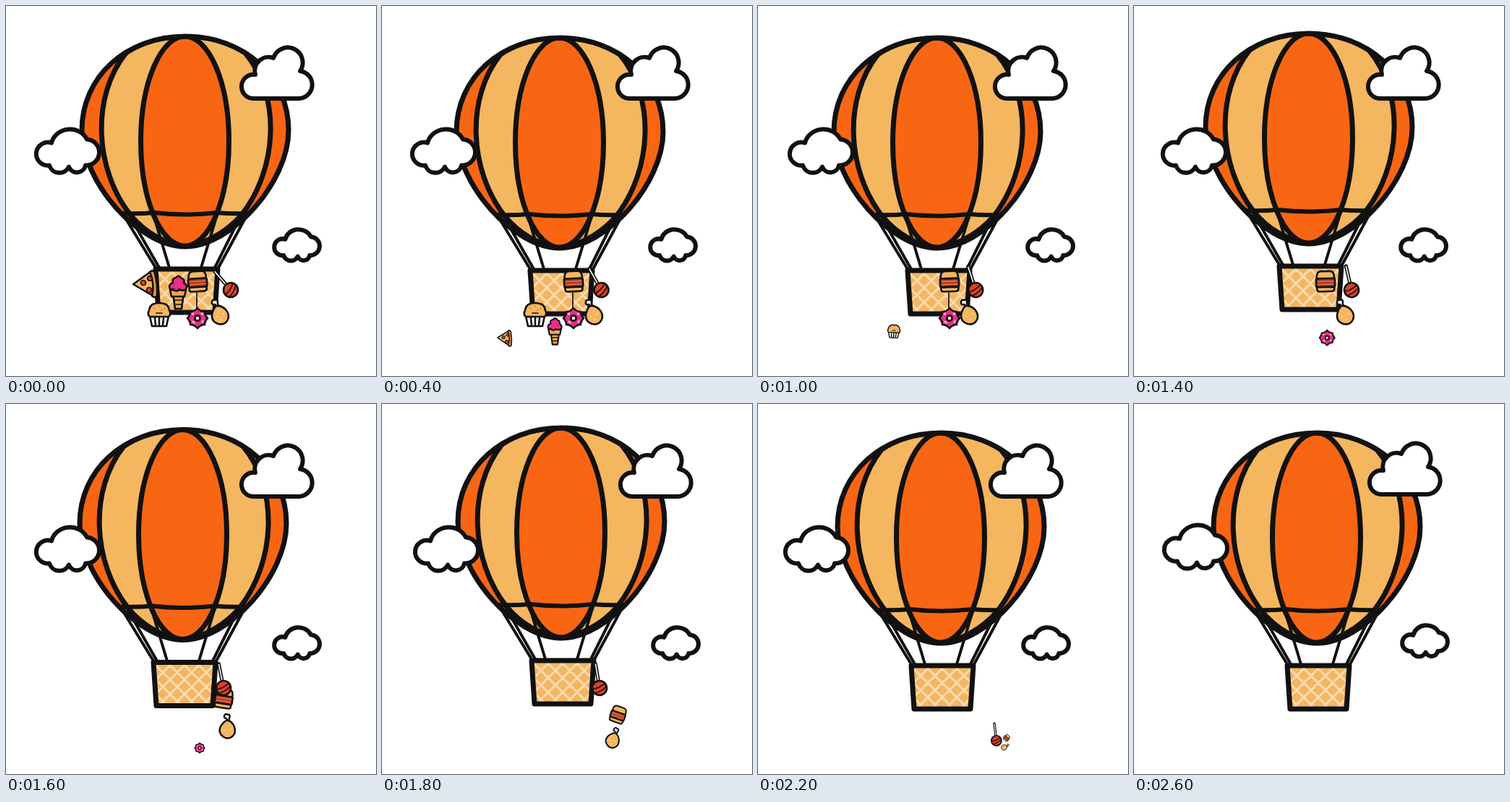
Recreate the animation shown at these times as an HTML page. Size 512 by 512 pixels, loop 2.8 s.

```html
<!DOCTYPE html>
<html lang="en">
<head>
<meta charset="utf-8">
<title>Balloon</title>
<style>
html, body { margin: 0; width: 100%; height: 100%; overflow: hidden; background: #fff; }
svg { display: block; width: 100vw; height: 100vh; }
.ink { stroke: #111; stroke-linejoin: round; stroke-linecap: round; }
.line { fill: none; }
.tan { fill: #f5b660; }
.orange { fill: #f86614; }
.red { fill: #dd4326; }
.pink { fill: #ea2d86; }
.white { fill: #fff; }
#food .ink { stroke-width: 2.6; }
#food .thin { stroke-width: 1.7; }
#clouds path { fill: #fff; stroke-width: 6; vector-effect: non-scaling-stroke; }
</style>
</head>
<body>
<svg viewBox="0 0 512 512">
  <defs>
    <path id="hull" d="M248 42C330 42 391 98 391 172C391 244 312 333 248 333C184 333 105 244 105 172C105 98 166 42 248 42Z"/>
    <path id="gore" d="M248 42Q200 42 166 65C118 125 122 225 172 289Q202 325 248 333Q294 325 326 289C376 225 381 125 331 65Q296 42 248 42Z"/>
    <path id="box" d="M207 364H293L289 424H211Z"/>
    <clipPath id="boxClip"><use href="#box"/></clipPath>
    <clipPath id="hullClip"><use href="#hull"/></clipPath>
  </defs>

  <g id="balloon">
    <use href="#hull" class="orange"/>
    <g clip-path="url(#hullClip)" class="ink" stroke-width="7">
      <use href="#gore" class="tan"/>
      <ellipse class="orange" cx="247.5" cy="187" rx="61" ry="145"/>
    </g>
    <use href="#hull" class="ink line" stroke-width="7"/>
    <path class="ink line" stroke-width="6" d="M160 287Q185 288 205 286Q248 291 292 286Q312 288 337 287"/>
    <path class="ink line" stroke-width="4" d="M163 290L207 362M173 294L212 362M204 289L226 362M333 290L294 362M323 294L289 362M292 289L270 362"/>
    <use href="#box" class="tan"/>
    <path id="lattice" clip-path="url(#boxClip)" fill="none" stroke="#f8dcb4" stroke-width="3"/>
    <use href="#box" class="ink line" stroke-width="7"/>
  </g>

  <g id="food">
    <g id="pizza">
      <path class="ink tan" d="M-17 1L8 -17Q16 0 12 18Z"/>
      <path class="ink" fill="#eb9440" d="M6 -16Q11 -20 13 -14Q17 2 16 17Q13 21 9 17Q13 0 6 -16Z"/>
      <g class="red ink thin">
        <circle cx="-3" cy="-1" r="3.5"/><circle cx="6" cy="-7" r="3.2"/><circle cx="5" cy="9" r="3.5"/>
      </g>
    </g>
    <g id="ice">
      <path class="ink" fill="#f2a750" d="M-7 0H8L5 22H-4Z"/>
      <path class="ink" fill="#f2a750" d="M-11 -4H11L9 5H-9Z"/>
      <path class="ink pink" d="M-11 -5Q-14 -12 -7 -14Q-9 -20 -3 -21Q1 -26 5 -20Q10 -19 8 -14Q14 -11 11 -5Q6 -2 2 -5Q-3 0 -6 -5Z"/>
      <path class="ink line thin" d="M-4 10H6M-3 16H5"/>
    </g>
    <g id="burger">
      <path class="ink tan" d="M-12 -3Q-13 -14 -6 -14H6Q13 -14 12 -3Z"/>
      <rect class="ink" fill="#a83322" x="-13" y="-4" width="26" height="12" rx="2"/>
      <path stroke="#ef7a38" stroke-width="1.6" d="M-11 0H11M-11 4H11"/>
      <path class="ink tan" d="M-12 8H12V11Q12 14 8 14H-8Q-12 14 -12 11Z"/>
    </g>
    <g id="lolli">
      <path class="ink" style="stroke-width:5" d="M0 -8V-34"/>
      <path stroke="#fff" stroke-width="1.6" d="M0 -10V-34"/>
      <circle class="ink red" r="10"/>
      <path class="ink line thin" d="M-9 0Q0 0 8 -5M-7 6Q2 5 9 0"/>
    </g>
    <g id="drum">
      <path class="ink white" d="M-4 -8L-7 -11Q-12 -10 -11 -15Q-10 -18 -7 -17Q-4 -19 -3 -15Q-4 -12 -1 -8Z"/>
      <path class="ink tan" d="M-5 -9Q2 -10 8 -4Q14 3 11 10Q7 18 -2 16Q-12 13 -11 3Q-9 -6 -5 -9Z"/>
      <path class="line" stroke="#fbe2b8" stroke-width="2" stroke-linecap="round" d="M-4 6h.1M2 10h.1M4 2h.1"/>
    </g>
    <g id="donut">
      <path id="string" class="ink thin" d="M-1 -35V-12"/>
      <path class="ink pink" d="M0 -14Q4 -9 10 -9Q10 -4 14 0Q10 4 10 9Q4 9 0 14Q-4 9 -10 9Q-10 4 -14 0Q-10 -4 -10 -9Q-4 -9 0 -14Z"/>
      <path stroke="#ffc3dc" stroke-width="2.2" d="M-8 -5l3 -2M5 -7l3 2M6 6l2 -3M-7 4l3 3"/>
      <circle class="ink white" r="3.6"/>
    </g>
    <g id="cupcake">
      <path class="ink white" d="M-13 2H13L10 16H-10Z"/>
      <path class="ink line" d="M-6 5L-5 14M0 5V14M6 5L5 14"/>
      <path class="ink tan" d="M-13 3Q-17 0 -14 -6Q-13 -16 0 -16Q13 -16 14 -6Q17 0 13 3Z"/>
      <path class="line" stroke="#de7a2a" stroke-width="2" stroke-linecap="round" d="M-7 -9h.1M0 -12h.1M7 -8h.1M3 -6h.1"/>
      <path class="ink line thin" d="M-4 -2H4"/>
    </g>
  </g>

  <g id="clouds" class="ink">
    <path d="M343 128A16.6 16.6 0 1 1 345 95A19 19 0 0 1 370 72A20.8 20.8 0 1 1 407 90A19.1 19.1 0 0 1 406 128Z"/>
    <path id="puff" transform="translate(0 -1.5)" d="M63 191A26 24 0 0 1 112 186A18 18 0 0 1 110 222A12 12 0 0 1 87 224A14.5 14.5 0 0 1 60 222A16 16 0 1 1 63 191Z"/>
    <path id="small" transform="translate(403 330) scale(.72) translate(-86 -201)"/>
  </g>
</svg>
<script>
const $ = id => document.getElementById(id);
const STEP = 200, STEPS = 14;

$("small").setAttribute("d", $("puff").getAttribute("d"));

let mesh = "";
for (let x = 120; x < 370; x += 20) mesh += `M${x} 358l74 74M${x} 358l-74 74`;
$("lattice").setAttribute("d", mesh);

// Turning points of the balloon: step, x, y
const sway = [[0, 0, 0], [2, -2, 2], [5, 0, 2], [7, -6, -4], [9, 0, -9], [11, 5, -2]];

// Each item falls along a curve (start, control, end) between two steps.
// size and turn are reached at the end; tilt and swing die away while hanging.
const items = {
  pizza:   { when: [0, 2],  path: [[193, 384], [182, 422], [170, 459]], size: .6, turn: 4 },
  ice:     { when: [0, 4],  path: [[238, 397], [238, 464], [242, 478]], size: .35 },
  cupcake: { when: [3, 6],  path: [[212, 427], [186, 430], [184, 476]], size: .12, turn: 5 },
  donut:   { when: [5, 8],  path: [[265, 432], [267, 449], [268, 476]], size: .5 },
  burger:  { when: [7, 11], path: [[265, 381], [349, 438], [344, 462]], size: .3, turn: 40, tilt: -4 },
  drum:    { when: [7, 11], path: [[292, 424], [325, 477], [342, 475]], size: .33, turn: 80, swing: 4 },
  lolli:   { when: [9, 12], path: [[301, 393], [332, 471], [335, 479]], size: .4, tilt: -41, swing: 10 }
};

const mix = (a, b, u) => a + (b - a) * u;
const curve = ([a, b, c], u, n) => mix(mix(a[n], b[n], u), mix(b[n], c[n], u), u);
const place = (id, x, y, rest = "") => $(id).setAttribute("transform", `translate(${x} ${y})${rest}`);

function swayAt(k) {
  const i = sway.findIndex(p => p[0] > k);
  if (i < 0) return sway[sway.length - 1].slice(1);
  const a = sway[i - 1], b = sway[i], u = (k - a[0]) / (b[0] - a[0]);
  return [mix(a[1], b[1], u), mix(a[2], b[2], u)];
}

function drawItem(id, k) {
  const { when: [from, to], path, size, turn = 0, tilt = 0, swing = 0 } = items[id];
  $(id).style.display = k > to ? "none" : "";
  const u = Math.min(1, Math.max(0, (k - from) / (to - from)));
  const x = curve(path, u, 0) + swing * .5 ** k;
  const angle = turn * u + tilt * .85 ** k;
  place(id, x, curve(path, u, 1), ` rotate(${angle}) scale(${mix(1, size, u ** 1.7)})`);
}

function draw(k) {
  const late = k > 11;
  place("balloon", ...swayAt(k));
  place("clouds", late ? 0 : Math.sin(k * Math.PI / 2) * (k > 8 ? 4 : 2), late ? -3 : 0);
  for (const id in items) drawItem(id, k);
  $("string").style.display = k > items.donut.when[0] ? "none" : "";
}

function tick() {
  draw(Math.floor(performance.now() / STEP) % STEPS);
  requestAnimationFrame(tick);
}
tick();
</script>
</body>
</html>
```
